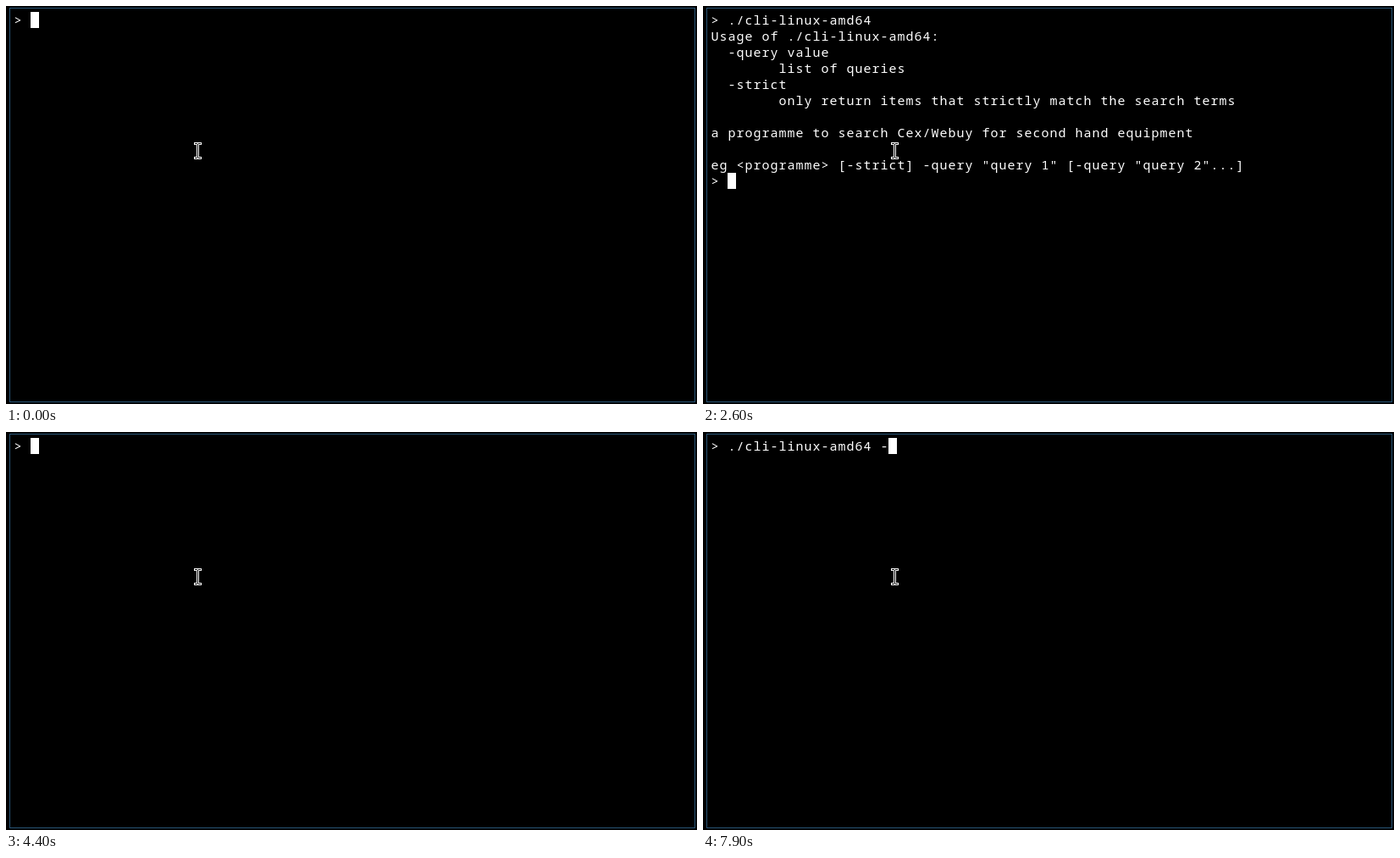
An HTML page with a canvas for the animation above (8 s loop, 816 by 470 pixels).

```html
<!DOCTYPE html>
<html lang="en">
<head>
<meta charset="utf-8">
<style>
html, body { margin: 0; width: 100%; height: 100%; overflow: hidden; background: #000; }
canvas { display: block; }
</style>
</head>
<body>
<canvas id="stage" width="816" height="470"></canvas>
<script>
const ctx = document.getElementById('stage').getContext('2d', { alpha: false });
const LOOP = 8000, KEY_MS = 100;
const LEFT = 9, TOP = 7, CELL_W = 10, CELL_H = 19, ASCENT = 15;

const usage = `> ./cli-linux-amd64
Usage of ./cli-linux-amd64:
  -query value
        list of queries
  -strict
        only return items that strictly match the search terms

a programme to search Cex/Webuy for second hand equipment

eg <programme> [-strict] -query "query 1" [-query "query 2"...]`.split('\n');

// Actions take the terminal, the time since they began and their text.
const type = (term, age, text) => { term.input += text.slice(0, 1 + Math.floor(age / KEY_MS)); };
const complete = (term, age, text) => { term.input += text; };
const run = term => { term.lines = usage; term.input = ''; };
const clear = term => { term.lines = []; term.input = ''; };

const script = [
  [700, type, './'],
  [1100, type, 'cl'],
  [1400, type, 'i'],
  [1600, complete, '-linux-amd64 '],
  [2600, run],
  [3700, type, 'cle'],
  [4100, type, 'a'],
  [4300, type, 'r'],
  [4400, clear],
  [5000, type, './'],
  [5400, type, 'cli'],
  [6100, type, '-'],
  [6300, type, 'li'],
  [6600, complete, 'nux-amd64 '],
  [7900, type, '-']
];

function rect(color, x, y, w, h) {
  ctx.fillStyle = color;
  ctx.fillRect(x, y, w, h);
}

function drawLine(text, row) {
  ctx.fillStyle = '#fff';
  [...text].forEach((ch, col) =>
    ctx.fillText(ch, LEFT + (col + 0.5) * CELL_W, TOP + row * CELL_H + ASCENT));
}

function drawPointer() {
  rect('#fff', 225, 162, 3, 18);
  for (const y of [161, 178]) {
    rect('#fff', 222, y, 9, 3);
    rect('#000', 223, y + 1, 3, 1);
    rect('#000', 227, y + 1, 3, 1);
  }
  rect('#000', 226, 163, 1, 16);
}

function draw(t) {
  const term = { lines: [], input: '' };
  for (const [at, action, text] of script) {
    if (t >= at) action(term, t - at, text);
  }
  const row = term.lines.length;
  const prompt = '> ' + term.input;

  rect('#000', 0, 0, 816, 470);
  ctx.strokeStyle = '#285577';
  ctx.strokeRect(4.5, 2.5, 809, 465);
  ctx.font = '15px "Noto Sans Mono", monospace';
  ctx.textAlign = 'center';
  [...term.lines, prompt].forEach(drawLine);
  rect('#fff', LEFT + prompt.length * CELL_W, TOP + row * CELL_H, CELL_W, CELL_H);
  drawPointer();
}

const begin = performance.now();
function frame() {
  draw((performance.now() - begin) % LOOP);
  requestAnimationFrame(frame);
}
frame();
</script>
</body>
</html>
```
